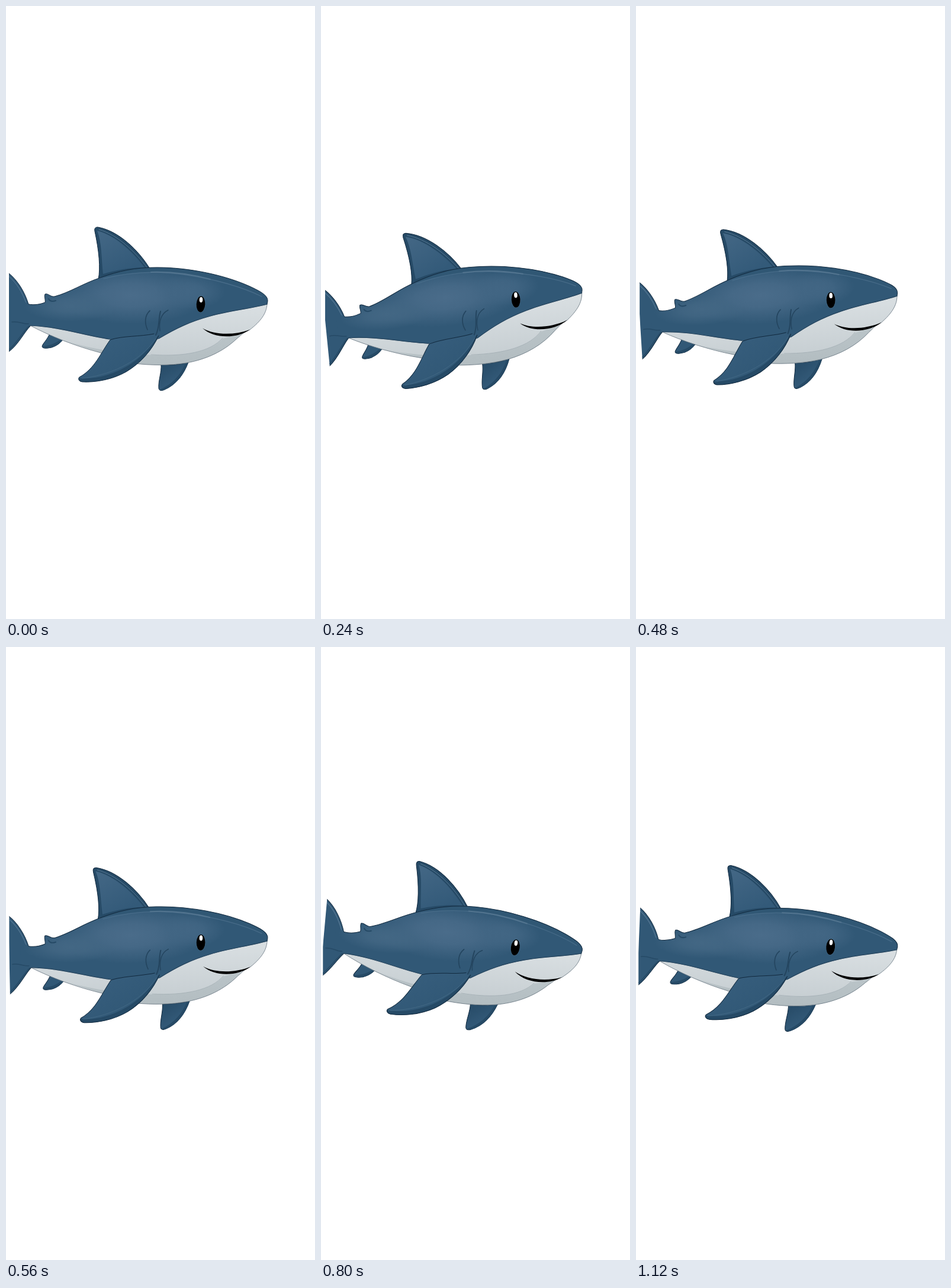
Write an HTML page with a canvas that moves like this. It is 522x1034 px and loops after 1200 ms.

```html
<!DOCTYPE html>
<html lang="en">
<head>
<meta charset="utf-8">
<title>Swimming shark</title>
<style>
html, body { margin: 0; width: 100%; height: 100%; overflow: hidden; background: #fff; }
canvas { display: block; width: 100%; height: 100%; }
</style>
</head>
<body>
<canvas id="stage" width="522" height="1034"></canvas>
<script>
const W = 522, H = 1034, LOOP = 1200, STEP = 80;
const ctx = document.getElementById('stage').getContext('2d');

const BLUE = '#315876', DARK = '#264a66', LINE = '#122a3f', LIGHT = '#5c7d98';

const shape = {
  tail: 'M-5 443L5 451C20 463 32 483 38 503L50 522L41 540C31 550 21 571 5 583L-5 590Z',
  back: 'M24 494L38 503C48 505 58 503 66 500C67 495 64 490 66 486C71 484 75 491 82 490' +
        'C108 483 130 468 160 458C190 447 218 441 255 441C310 441 370 454 412 473' +
        'C429 481 443 488 442 498L441 503C410 511 376 514 345 523C312 532 288 543 258 561' +
        'L225 575L175 562C130 555 90 541 41 539L24 538Z',
  belly: 'M41 539C90 541 130 555 175 562L225 575L258 561C288 543 312 532 345 523' +
         'C376 514 410 511 441 503C440 519 430 532 412 546C401 550 398 555 390 561' +
         'C367 583 338 596 305 602C275 607 244 606 217 603L160 585C118 574 75 557 41 539Z',
  bellyShade: 'M100 565C150 580 195 586 235 588C295 592 342 586 366 561L398 553' +
              'C372 582 338 596 305 602C275 607 244 606 217 603L160 585Z',
  dorsal: 'M156 461C160 442 157 412 150 380C149 375 151 373 155 373C190 379 224 412 243 443' +
          'C212 442 184 450 156 461Z',
  dorsalFace: 'M164 452C161 425 162 399 154 379C186 387 216 417 234 441C207 441 185 446 164 452Z',
  fin: 'M176 563C199 556 225 558 250 553L258 556C247 580 227 603 203 617C178 631 150 635 129 634' +
       'C123 633 121 629 124 626C150 612 160 585 176 563Z',
  finEdge: 'M256 557C240 583 216 604 188 616C165 626 145 629 123 628C123 632 125 634 129 634' +
           'C150 635 178 631 203 617C227 603 247 580 258 556Z',
  farFin: 'M262 605C263 618 257 632 258 645C259 650 264 649 268 647C287 639 300 622 308 601' +
          'C292 605 278 606 262 605Z',
  farFinEdge: 'M303 603C295 622 281 638 260 647C263 650 269 647 273 645C290 636 302 619 308 601Z',
  pelvic: 'M74 552C70 563 62 569 61 574C61 579 72 577 77 576C86 573 91 569 96 563Z',
  pelvicEdge: 'M90 564C82 570 72 573 61 574C62 579 72 577 77 576C86 573 91 569 96 563Z',
  ridge: 'M160 458C190 447 218 441 255 441C310 441 370 454 412 473C429 481 440 487 442 494' +
         'C410 477 358 460 306 453C258 446 205 449 160 458Z',
  mouth: 'M332 543.5C352 555 384 556 412 546C391 561 352 562 332 543.5Z'
};
for (const name in shape) shape[name] = new Path2D(shape[name]);

function fill(path, color) {
  ctx.fillStyle = color;
  ctx.fill(path);
}

function stroke(path, color, width) {
  ctx.strokeStyle = color;
  ctx.lineWidth = width;
  ctx.stroke(typeof path === 'string' ? new Path2D(path) : path);
}

function solid(path, color) {
  fill(path, color);
  stroke(path, LINE, 1);
}

function oval(x, y, rx, ry, tilt, color) {
  ctx.beginPath();
  ctx.ellipse(x, y, rx, ry, tilt, 0, Math.PI * 2);
  ctx.fillStyle = color;
  ctx.fill();
}

function gradient(x0, y0, x1, y1, ...colors) {
  const g = ctx.createLinearGradient(x0, y0, x1, y1);
  colors.forEach((c, i) => g.addColorStop(i / (colors.length - 1), c));
  return g;
}

function glow(x, y, rx, ry, color) {
  ctx.save();
  ctx.translate(x, y);
  ctx.scale(rx, ry);
  const g = ctx.createRadialGradient(0, 0, 0, 0, 0, 1);
  g.addColorStop(0, color + 'ff');
  g.addColorStop(0.4, color + 'cc');
  g.addColorStop(1, color + '00');
  oval(0, 0, 1, 1, 0, g);
  ctx.restore();
}

function drawFarFins() {
  solid(shape.pelvic, BLUE);
  fill(shape.pelvicEdge, DARK);
  solid(shape.farFin, gradient(260, 605, 285, 645, DARK, '#365d7c'));
  fill(shape.farFinEdge, DARK);
}

function drawBody() {
  solid(shape.dorsal, DARK);
  fill(shape.dorsalFace, gradient(160, 385, 195, 450, '#426684', '#335a79'));
  stroke('M157 377C189 386 219 415 238 441', LIGHT, 0.9);
  solid(shape.tail, BLUE);
  stroke('M5 456C18 467 28 484 34 501', LIGHT, 1);
  stroke('M5 580C19 568 29 549 39 540', DARK, 2);

  fill(shape.belly, gradient(0, 510, 0, 605, '#d8dee1', '#c4ccd0'));
  fill(shape.bellyShade, gradient(0, 555, 0, 605, '#bac4c8', '#b3bdc1'));
  stroke('M245 588C300 592 345 584 366 560', '#a3aeb4', 0.8);
  stroke(shape.belly, '#66747f', 0.8);

  fill(shape.back, BLUE);
  ctx.save();
  ctx.clip(shape.back);
  glow(212, 488, 130, 48, '#4a6c8a');
  glow(110, 506, 80, 26, '#436784');
  glow(310, 482, 60, 30, '#426684');
  fill(shape.ridge, '#305774');
  stroke('M165 460C208 449 258 446 306 454C350 460 400 474 432 490', '#476b88', 1.3);
  stroke('M245 449C280 448 315 453 345 461', '#52748f', 2);
  ctx.restore();
  stroke('M38 503C48 505 58 503 66 500C67 495 64 490 66 486C71 484 75 491 82 490' +
    'C108 483 130 468 160 458C190 447 218 441 255 441C310 441 370 454 412 473' +
    'C429 481 443 488 442 498L441 503', LINE, 1);
  stroke('M258 561C288 543 312 532 345 523C376 514 410 511 441 503', '#24445e', 1.2);
  stroke('M41 539C90 541 130 555 175 562', '#24445e', 1.2);
  stroke('M72 494C74 498 78 499 84 497', DARK, 2);
  stroke('M10 533C23 531 28 537 38 536', DARK, 1.5);
}

function drawNearFin() {
  fill(shape.fin, gradient(170, 560, 205, 618, '#365d7c', BLUE));
  fill(shape.finEdge, DARK);
  stroke('M128 628C170 624 225 603 253 561', '#446985', 0.9);
  stroke('M250 553C225 558 199 556 176 563C160 585 150 612 124 626C121 629 123 633 129 634' +
    'C150 635 178 631 203 617C227 603 247 580 258 556', LINE, 1);
  stroke('M243 514C234 522 234 535 239 546', '#24455f', 1.7);
  stroke('M274 513C261 519 258 534 260 548', '#24455f', 1.5);
  stroke('M261 515C257 529 260 542 253 555', '#24455f', 2);
}

function drawFace() {
  oval(329, 503, 8, 14, 0.05, '#456985');
  oval(329, 503, 7.4, 13.4, 0.05, '#000');
  oval(329.5, 495.5, 2.8, 4.6, 0.05, '#fff');
  fill(shape.mouth, '#000');
}

function draw(time) {
  // The pose advances in even steps, fifteen to a loop.
  const phase = Math.floor(time % LOOP / STEP) * STEP / LOOP * Math.PI * 2;
  const swing = Math.sin(phase);
  const sway = 2 * swing;
  const bob = -1.6 * (1 - Math.cos(phase));

  ctx.fillStyle = '#fff';
  ctx.fillRect(0, 0, W, H);
  ctx.save();
  ctx.beginPath();
  ctx.rect(5 + sway, 0, W, H);
  ctx.clip();
  ctx.translate(W / 2 + sway, H / 2 + bob);
  ctx.rotate(-6 * swing * Math.PI / 180);
  ctx.translate(-W / 2, -H / 2);
  ctx.beginPath();
  ctx.rect(5, 0, W, H);
  ctx.clip();
  ctx.lineCap = ctx.lineJoin = 'round';
  drawFarFins();
  drawBody();
  drawNearFin();
  drawFace();
  ctx.restore();
}

const start = performance.now();
function tick() {
  draw(performance.now() - start);
  requestAnimationFrame(tick);
}
tick();
</script>
</body>
</html>
```
